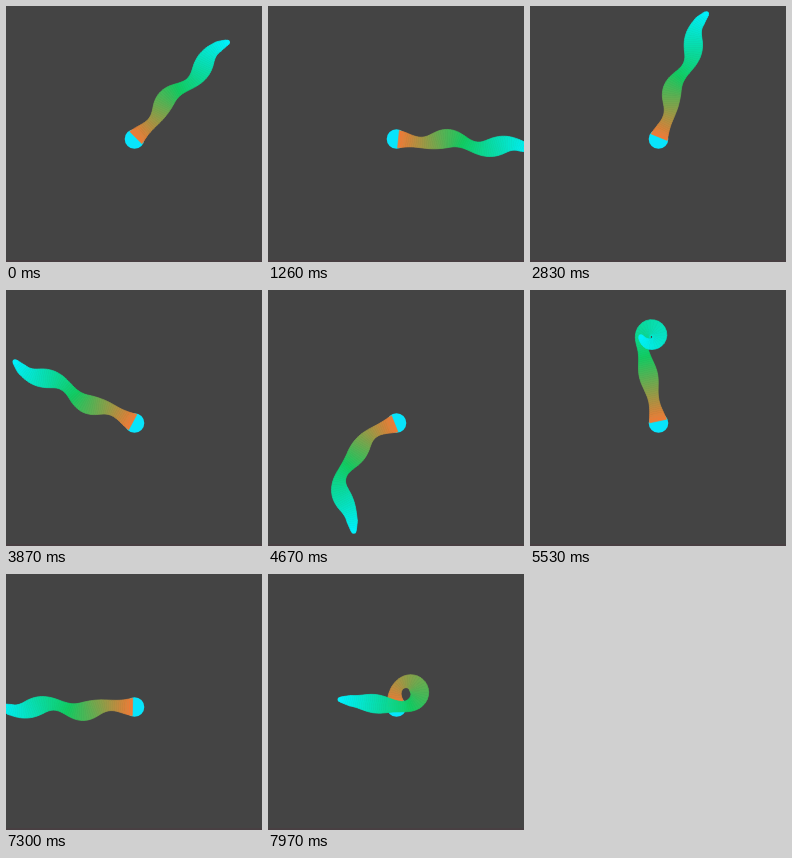
These frames come from a looping animation (256x256 px, 8000 ms). An HTML page with a canvas:

```html
<!DOCTYPE html>
<html lang="en">
<head>
<meta charset="utf-8">
<title>Tentacle</title>
<style>
  html, body { margin: 0; height: 100%; overflow: hidden; background: #444; }
  canvas { display: block; width: 256px; height: 256px; }
</style>
</head>
<body>
<canvas width="256" height="256"></canvas>
<script>
const ctx = document.querySelector('canvas').getContext('2d');
const LOOP = 8000, LENGTH = 138, STEP = 2;
const BASE = { x: 128.5, y: 133, radius: 9.8 };
const ORANGE = [255, 116, 50], GREEN = [18, 204, 98], CYAN = [0, 240, 250];

// The arm leaves its base at `heading` degrees and turns by `turn` degrees
// around position `at` (0 base, 1 tip), spread over `span` of its length.
const pose = (time, heading, curl) =>
  ({ time, heading, turn: 0, at: 0.5, span: 1, ripple: 1, ...curl });

// A full turn with no span looks straight; widening it opens a loop.
const knot = (turns, at) => ({ turn: 360 * turns, at, span: 0 });

const POSES = [
  pose(0, -46),
  pose(830, -29),
  pose(1260, 5),
  pose(1680, 16),
  pose(2510, -43),
  pose(4185, -178),
  pose(4600, -205, { turn: -60 }),
  pose(5015, -188, { turn: -260, span: 1.2, ripple: 0 }),
  pose(5280, -82, knot(-1, 0.5)),
  pose(5280, -82),
  pose(5530, -102, { turn: 360, at: 0.8, span: 0.5, ripple: 0 }),
  pose(5860, -72),
  pose(5860, -72, knot(-1, 0.45)),
  pose(6630, -146, { turn: -280, at: 0.43, span: 0.46, ripple: 0 }),
  pose(7100, -165, knot(-1, 0.45)),
  pose(7520, -195, knot(-1, 0.3)),
  pose(7520, -195, knot(1, 0.3)),
  pose(7970, -105, { turn: 292, at: 0.29, span: 0.62, ripple: 0 }),
];

const clamp01 = v => Math.min(1, Math.max(0, v));
const lerp = (a, b, k) => a + (b - a) * k;
const smooth = k => k * k * (3 - 2 * k);

function poseAt(time) {
  const next = POSES.findIndex(p => p.time > time);
  if (next < 0) return POSES[POSES.length - 1];
  const a = POSES[next - 1], b = POSES[next];
  const k = (time - a.time) / (b.time - a.time);
  return Object.fromEntries(Object.keys(a).map(key => [key, lerp(a[key], b[key], k)]));
}

function angleAt({ heading, turn, at, span, ripple }, u) {
  const curl = turn * smooth(clamp01((u - at) / Math.max(span, 0.001) + 0.5));
  const wave = 21 * clamp01(u / 0.3) * Math.cos(2 * Math.PI * (u - 0.51) / 0.46);
  return (heading + curl + ripple * wave) * Math.PI / 180;
}

function widthAt(s) {
  const swell = 14.4 + 4 * Math.cos(2 * Math.PI * (s - 49) / 53.5);
  return Math.min(swell, 5 + (LENGTH - s) * 0.55);
}

function colorAt(u) {
  const [from, to, k] = u < 0.5 ? [ORANGE, GREEN, u * 2] : [GREEN, CYAN, u * 2 - 1];
  return `rgb(${from.map((v, i) => Math.round(lerp(v, to[i], k)))})`;
}

function disc(x, y, radius, color) {
  ctx.fillStyle = color;
  ctx.beginPath();
  ctx.arc(x, y, radius, 0, 2 * Math.PI);
  ctx.fill();
}

// One slice of the arm between two cross-sections.
function slice(a, b, color) {
  ctx.fillStyle = ctx.strokeStyle = color;
  ctx.beginPath();
  ctx.moveTo(a.x + a.nx, a.y + a.ny);
  ctx.lineTo(b.x + b.nx, b.y + b.ny);
  ctx.lineTo(b.x - b.nx, b.y - b.ny);
  ctx.lineTo(a.x - a.nx, a.y - a.ny);
  ctx.closePath();
  ctx.fill();
  ctx.stroke();
}

function draw(time) {
  ctx.fillStyle = '#444';
  ctx.fillRect(0, 0, 256, 256);
  ctx.fillStyle = '#483f42';
  ctx.fillRect(0, 254, 256, 2);
  disc(BASE.x, BASE.y, BASE.radius, '#08e4fb');

  const current = poseAt(time);
  ctx.lineWidth = 0.7;
  ctx.lineJoin = 'round';
  let { x, y } = BASE, previous;
  for (let s = 0; s <= LENGTH; s += STEP) {
    const angle = angleAt(current, s / LENGTH), half = widthAt(s) / 2;
    const section = { x, y, nx: -Math.sin(angle) * half, ny: Math.cos(angle) * half };
    if (s > STEP) slice(previous, section, colorAt(s / LENGTH));
    previous = section;
    x += Math.cos(angle) * STEP;
    y += Math.sin(angle) * STEP;
  }
  disc(previous.x, previous.y, widthAt(LENGTH) / 2, colorAt(1));
}

const start = performance.now();
function tick() {
  draw((performance.now() - start) % LOOP);
  requestAnimationFrame(tick);
}
tick();
</script>
</body>
</html>
```
